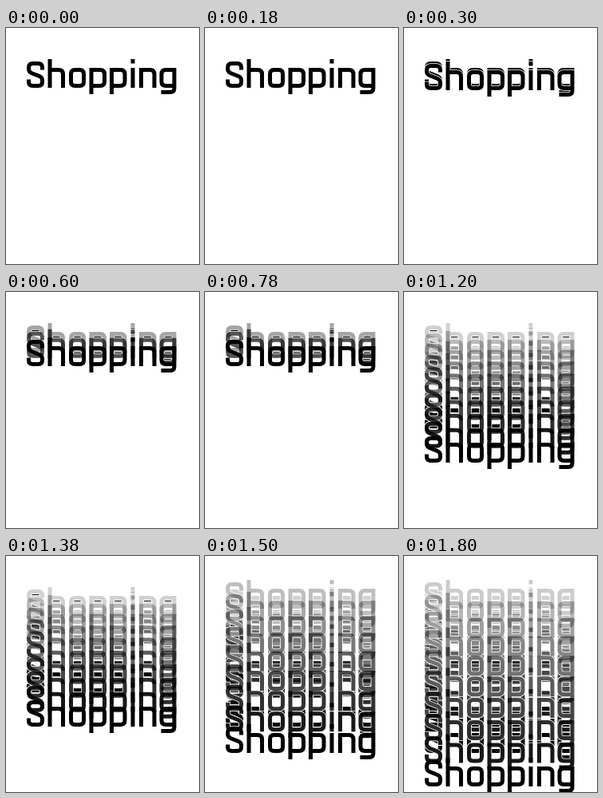
Recreate the animation shown at these times as an HTML page with a canvas. Size 242 by 296 pixels, loop 2.1 s.

```html
<!DOCTYPE html>
<html lang="en">
<head>
<meta charset="utf-8">
<title>Shopping</title>
<style>
html, body { margin: 0; width: 100%; height: 100%; overflow: hidden; background: #fff; }
canvas { display: block; width: 242px; height: 296px; }
</style>
</head>
<body>
<canvas id="stage" role="img" aria-label="Shopping"></canvas>
<script>
const W = 242, H = 296, HOLD = 300, WEIGHT = 5, FRINGE = 1.6, SPREAD = 1.2;
const canvas = document.getElementById('stage');
const ratio = window.devicePixelRatio || 1;
canvas.width = W * ratio;
canvas.height = H * ratio;
const ctx = canvas.getContext('2d');

// Centre lines of each letter, drawn from its left stem.
const arch = x => `M${x} 72.5V52.5H${x + 11}Q${x + 16.5} 52.5 ${x + 16.5} 58V72.5`;
const bowl = x => `M${x + 5} 52.5H${x + 11}Q${x + 16} 52.5 ${x + 16} 57.5V67.5Q${x + 16} 72.5 ${x + 11} 72.5H${x + 5}Q${x} 72.5 ${x} 67.5V57.5Q${x} 52.5 ${x + 5} 52.5Z`;
const letterP = x => `M${x} 80.5V52.5H${x + 11}Q${x + 16.5} 52.5 ${x + 16.5} 58V67Q${x + 16.5} 72.5 ${x + 11} 72.5H${x}`;
const word = new Path2D([
  'M45.5 50V49.5Q45.5 44.5 40.5 44.5H33.5Q28.5 44.5 28.5 49.5V51Q28.5 55 32 56.5L42 60.5Q45.5 62 45.5 65.5V67.5Q45.5 72.5 40.5 72.5H33.5Q28.5 72.5 28.5 67.5V67',
  'M55 41.5V72.5', arch(55),
  bowl(81.5),
  letterP(107), letterP(132.5),
  'M159 41.5V42M159 52.5V72.5',
  arch(169.5),
  'M211 72.5H200.5Q195 72.5 195 67V58Q195 52.5 200.5 52.5H211V75.5Q211 80.5 206 80.5H197'
].join(''));

// Each pose: first and last offset, number of copies, opacity of the first copy.
const poses = [
  { from: 0, to: 0, count: 1, faint: 1 },
  { from: 3, to: 3, count: 1, faint: 1 },
  { from: 0, to: 18, count: 3, faint: 0.35 },
  { from: 0, to: 96, count: 9, faint: 0.15 },
  { from: 0, to: 139, count: 10, faint: 0.18 },
  { from: -9, to: 172, count: 9, faint: 0.25 },
  { from: -9, to: 214, count: 10, faint: 0.2 }
];

function line(y, width, colour) {
  ctx.save();
  ctx.translate(0, y);
  ctx.lineWidth = width;
  ctx.strokeStyle = colour;
  ctx.stroke(word);
  ctx.restore();
}

// A trail knocks out what lies below it, then fades in from top to bottom.
function drawTrail({ from, to, count, faint }) {
  const copies = Array.from({ length: count }, (_, i) => {
    const part = count > 1 ? i / (count - 1) : 1;
    return { y: from + (to - from) * part ** SPREAD, alpha: faint + (1 - faint) * part };
  });
  for (const { y } of copies) line(y, WEIGHT + FRINGE, '#fff');
  for (const { y, alpha } of copies) line(y, WEIGHT, `rgba(0,0,0,${alpha})`);
}

// Earlier trails stay on the stage until the loop restarts.
function draw(step) {
  ctx.setTransform(ratio, 0, 0, ratio, 0, 0);
  ctx.fillStyle = '#fff';
  ctx.fillRect(0, 0, W, H);
  ctx.lineCap = 'square';
  poses.slice(0, step + 1).forEach(drawTrail);
}

let shown = -1;
function tick(now) {
  const step = Math.floor(now / HOLD) % poses.length;
  if (step !== shown) draw(shown = step);
  requestAnimationFrame(tick);
}
tick(performance.now());
</script>
</body>
</html>
```
